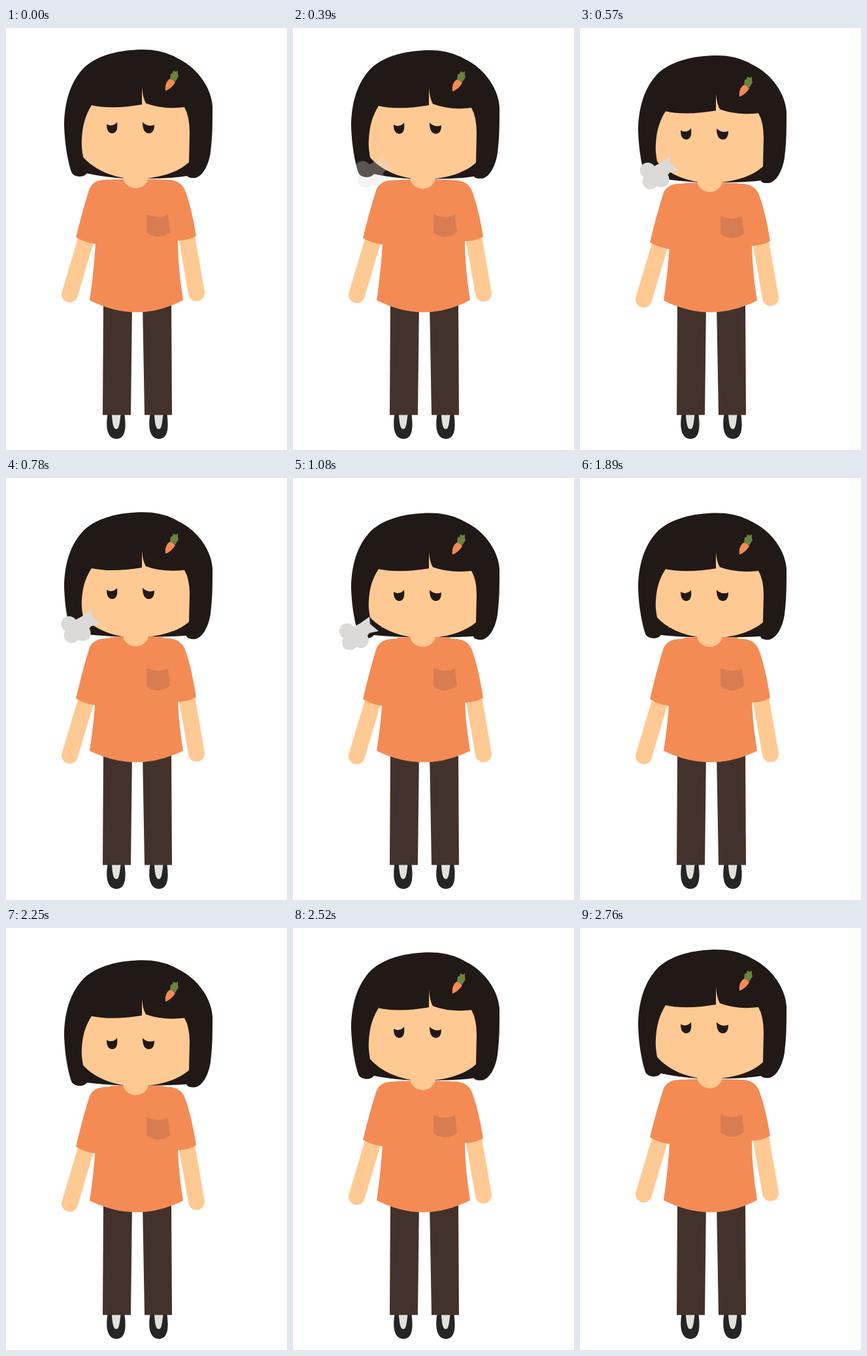
An HTML page for the animation above (3000 ms loop, 430 by 645 pixels).

```html
<!DOCTYPE html>
<html>
<head>
<meta charset="utf-8">
<style>
  html, body { margin: 0; height: 100%; overflow: hidden; background: #fff; }
  svg { display: block; width: 100vw; height: 100vh; }
</style>
</head>
<body>
<svg viewBox="0 0 430 645">
  <g fill="#252525">
    <path id="shoe" d="M156 588C152 608 154 628 169 628C184 628 184 608 181 588Z"/>
    <use href="#shoe" x="65"/>
  </g>
  <g fill="#e3e1de">
    <path id="sock" d="M161.5 588C163 600 163 613 169 613C174 613 174 600 176 588Z"/>
    <use href="#sock" x="65"/>
  </g>
  <path fill="#43322b" d="M149 420H193L191 591.5H148ZM209 420H253L254 591.5H212Z"/>
  <g fill="none" stroke="#ffc993" stroke-width="25" stroke-linecap="round">
    <path id="leftArm" d="M124 318L97.5 407"/>
    <path id="rightArm" d="M276 316L291.5 405"/>
  </g>
  <g fill="#211915">
    <path id="nape" d="M118 195V222H123Q150 228 182 230H217Q255 230 278 226V195Z"/>
    <path id="hair" d="M210 33C172 33 140 42 120 60C98 82 89 115 89 150C90 180 95 205 100 220C103 228 117 229 122 224L140 205H265L277 226Q280 230 290 229C303 226 311 205 313 190C316 165 316 150 316 120C315 95 296 62 262 46Q240 33 210 33Z"/>
  </g>
  <path id="face" fill="#ffc993" d="M131 118Q162 125 208 117V90Q209 106 214 115Q240 125 273 121Q281 135 281 160L280 205C262 222 232 230 199 231C165 230 135 217 118 197Q115 180 116 170Q117 140 131 118Z"/>
  <g id="carrot">
    <path fill="#6a833f" d="M251 78L252 70L255 69L256 65L260 67L263 65V71L264 74L259 82Z"/>
    <path fill="#f48b55" d="M244 96C243 88 245 82 250 78Q255 78 259 83Q254 92 244 96Z"/>
  </g>
  <path id="eyes" fill="#211915" d="M154 147Q163 152 170 144Q172 161 162 161Q154 160 154 147ZM209 144Q217 152 227 148Q227 161 218 161Q209 160 209 144Z"/>
  <g fill="#f48b55">
    <path id="torso" d="M182 231L160 232L140 250L137 330Q134 375 128 416Q200 453 271 416Q263 365 263 325L262 250L240 232L217 231Z"/>
    <path id="sleeves" d="M182 231L150 232Q134 233 128 245Q118 275 107 320Q121 328 137 330H150ZM217 231L250 232Q266 233 273 246Q283 270 291 318Q278 325 263 325H250Z"/>
  </g>
  <path id="pocket" fill="#d87d51" d="M215 284Q232 293 248 285L251 312Q234 325 215 313Z"/>
  <path id="neck" fill="#ffc993" d="M180 228V233C188 249 209 249 217 233V228Z"/>
  <g id="puff" fill="#dbdad9">
    <circle cx="83" cy="234" r="12"/>
    <circle cx="87" cy="251" r="12"/>
    <circle cx="104" cy="248" r="12"/>
    <path id="tail"/>
  </g>
</svg>
<script>
const LOOP = 3000;
const part = id => document.getElementById(id);
const clamp = x => Math.min(1, Math.max(0, x));
const ramp = (t, start, length) => clamp((t - start) / length);
const easeQuad = x => x < .5 ? 2 * x * x : 1 - 2 * (1 - x) ** 2;
const smooth = x => x * x * (3 - 2 * x);

// Shifts height y0 by d0 and height y1 by d1, stretching in between.
function sink(id, amount, d0, d1 = d0, y0 = 0, y1 = 1) {
  const scale = 1 + (d1 - d0) * amount / (y1 - y0);
  const shift = y0 + d0 * amount - scale * y0;
  part(id).setAttribute('transform', `matrix(1 0 0 ${scale} 0 ${shift})`);
}

function draw(t) {
  const slump = easeQuad(ramp(t, 300, 580)) - easeQuad(ramp(t, 2010, 750));
  const gaze = easeQuad(ramp(t, 320, 600)) - easeQuad(ramp(t, 2100, 660));
  sink('hair', slump, 20.5, 18, 33, 229);
  sink('nape', slump, 18, 13.5, 222, 230);
  sink('face', slump, 21, 14, 120, 230);
  sink('carrot', slump, 21);
  sink('eyes', gaze, 27);
  sink('neck', slump, 14, 13, 230, 245);
  sink('torso', slump, 12, 0, 232, 434);
  sink('sleeves', slump, 14, 18, 232, 320);
  sink('pocket', slump, 6);
  sink('leftArm', slump, 18);
  sink('rightArm', slump, 17);

  const drift = smooth(ramp(t, 330, 1500)) - .5;
  const prong = 131 - 11 * ramp(t, 1080, 390);
  part('puff').setAttribute('transform', `translate(${-48 * drift} ${38 * drift})`);
  part('puff').setAttribute('opacity', ramp(t, 330, 200) * (1 - ramp(t, 1500, 330)));
  part('tail').setAttribute('d', `M92 228L103 222L117 212L118 223L${prong} 234L117 237L108 248L88 246Z`);
}

function tick(now) {
  draw(now % LOOP);
  requestAnimationFrame(tick);
}
draw(0);
requestAnimationFrame(tick);
</script>
</body>
</html>
```
